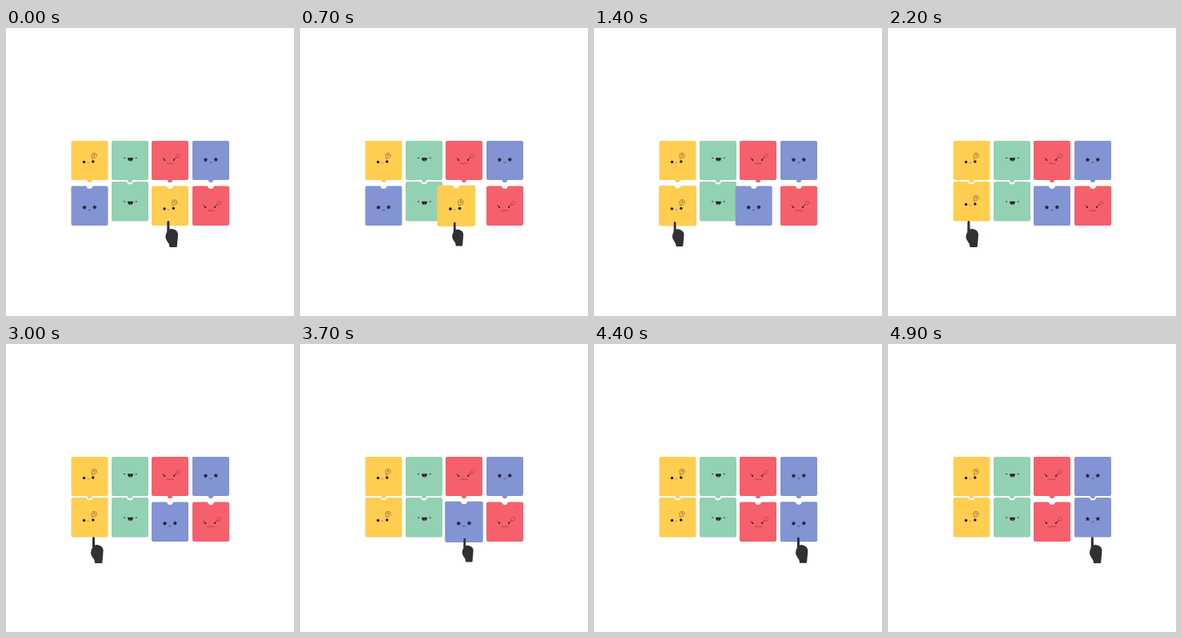
An HTML page with a canvas that plays this animation: 360 by 360 pixels, repeating every 5 s.

```html
<!DOCTYPE html>
<html lang="en">
<head>
<meta charset="utf-8">
<title>Matching cards</title>
<style>
html, body { margin: 0; width: 100%; height: 100%; overflow: hidden; background: #fff; }
canvas { display: block; width: 100vw; height: 100vh; }
</style>
</head>
<body>
<canvas></canvas>
<script>
const SIZE = 360, LOOP = 5000, DPR = window.devicePixelRatio || 1;
const canvas = document.querySelector('canvas');
const ctx = canvas.getContext('2d');
canvas.width = canvas.height = SIZE * DPR;

const COLORS = { yellow: '#ffcd50', green: '#93d1b3', red: '#f6606c', blue: '#8294d3' };
const INK = '#25202a', HAND = '#303133';
const SLOTS = [104.5, 155, 205, 256];
const TOP_Y = 141, LOOSE_Y = 197.5, DOCKED_Y = 192;
const CARD_W = 46, CARD_H = 49;
// Faces sit a little lower on the bottom cards.
const FACE_DROP = { yellow: 2, green: 3.5, red: 2.5, blue: 3 };

const progress = (t, from, to) => Math.min(1, Math.max(0, (t - from) / (to - from)));
const cubic = u => u < .5 ? 4 * u ** 3 : 1 - 4 * (1 - u) ** 3;
const ease = (t, from, to) => cubic(progress(t, from, to));
const mix = (a, b, u) => a + (b - a) * u;

function dot(x, y, r, color = INK) {
  ctx.fillStyle = color;
  ctx.beginPath();
  ctx.arc(x, y, r, 0, 7);
  ctx.fill();
}

function line(path, width = .8, color = INK) {
  ctx.strokeStyle = color;
  ctx.lineWidth = width;
  ctx.stroke(new Path2D(path));
}

function star(x, y, r) {
  ctx.fillStyle = INK;
  ctx.beginPath();
  for (let i = 0; i < 10; i++) {
    const a = i * Math.PI / 5 - Math.PI / 2, d = i % 2 ? r * .5 : r;
    ctx.lineTo(x + d * Math.cos(a), y + d * Math.sin(a));
  }
  ctx.fill();
}

// Face coordinates: x from the card's middle, y from its top edge.
const FACES = {
  yellow() {
    dot(-7, 26.5, 1.75);
    dot(4.3, 26, 1.75);
    line('M-3 27.3q1.3 1.3 2.4 0', .7, '#9a7540');
    line('M3.2 22.3l-.2-2.2a3.1 3.1 0 1 1 2.3 1.4z', .65, '#6b5430');
    line('M4.8 17.6q1-1.2 1.5 0q0 .7-.8 1.1v.5', .6);
  },
  green() {
    line('M-7.7 21.6q.6-1.3 1.6 0M6.9 21.6q1-1.3 1.7 0', 1);
    ctx.fillStyle = INK;
    ctx.fill(new Path2D('M-2.9 21.2h6.8q0 4.2-3.4 4.2t-3.4-4.2z'));
    dot(.6, 24.5, .9, '#a0606c');
  },
  red() {
    line('M-9 21.8l2.8 2.1M7 21.8l-2.7 2.1', .9);
    dot(-6.9, 24, 1);
    dot(5, 24, 1);
    line('M-4.3 28.6q1.2-1.5 2.2-.3t2 0t2 0t2.4-.2', .7, '#873641');
    line('M6 23l2.2-2.3M8.2 20.7c-1.2-2 .3-4.2 2.6-4.1c2.4.2 2.6 3.4.4 4c-1.2.4-2 .1-3 .1', .65, '#914047');
  },
  blue() {
    star(-6.5, 23.7, 3);
    star(6.3, 23.5, 3);
    line('M-1.5 27q1.4 1.7 2.8-.1', .8, '#493d65');
  }
};

const TOP_SHAPE = new Path2D();
TOP_SHAPE.roundRect(-CARD_W / 2, 0, CARD_W, CARD_H, 2);
TOP_SHAPE.arc(0, CARD_H, 3.1, 0, Math.PI);
const BOTTOM_SHAPE = new Path2D(
  'M-21 0H-5Q-4 0-3.7 1Q-2.8 3.5 0 3.5T3.7 1Q4 0 5 0H21Q23 0 23 2' +
  'V47.5Q23 49.5 21 49.5H-21Q-23 49.5-23 47.5V2Q-23 0-21 0Z');
const HAND_SHAPE = new Path2D(
  'M-1.6 1.2Q-.2-1 1.3 1.2L1.5 10.5Q4 9.4 6.2 10.5Q11 11.5 12 16.5' +
  'L11.5 24L10.6 33H1.5L.8 29Q-3.4 23.5-3.6 20Q-3.6 17-1.8 14Z');

function card(kind, x, y, { bottom = false, scale = 1 } = {}) {
  ctx.save();
  ctx.translate(x, y + CARD_H / 2);
  ctx.scale(scale, scale);
  ctx.translate(0, -CARD_H / 2);
  ctx.fillStyle = COLORS[kind];
  ctx.fill(bottom ? BOTTOM_SHAPE : TOP_SHAPE);
  if (bottom) ctx.translate(0, FACE_DROP[kind]);
  FACES[kind]();
  ctx.restore();
}

function hand(x, press) {
  const scale = mix(1, .9, press);
  ctx.save();
  ctx.translate(x + 4, 241 + 17);
  ctx.scale(scale, scale);
  ctx.translate(-4, -17);
  ctx.fillStyle = HAND;
  ctx.fill(HAND_SHAPE);
  ctx.restore();
}

// The held card follows the pointer and snaps once it is near its slot.
function dragX(from, to, u) {
  const x = mix(from, to, u);
  return Math.abs(to - x) < 7 ? to : x;
}

const pressed = (t, down, up) => progress(t, down, down + 80) - progress(t, up, up + 150);

function draw(t) {
  ctx.setTransform(canvas.width / SIZE, 0, 0, canvas.height / SIZE, 0, 0);
  ctx.fillStyle = '#fff';
  ctx.fillRect(0, 0, SIZE, SIZE);
  ctx.lineCap = ctx.lineJoin = 'round';

  const [s1, s2, s3, s4] = SLOTS;
  const drag1 = ease(t, 440, 1340), drag2 = ease(t, 3700, 4280);
  const press1 = pressed(t, 330, 1340), press2 = pressed(t, 3610, 4280);
  const yellowDock = ease(t, 1550, 1800), blueDock = ease(t, 4550, 4800);

  ['yellow', 'green', 'red', 'blue'].forEach((kind, i) => card(kind, SLOTS[i], TOP_Y));

  const bottomCard = (kind, x, dock = 0, press = 0) =>
    card(kind, x, mix(LOOSE_Y, DOCKED_Y, dock), { bottom: true, scale: 1 + .035 * press });

  const yellow = () => bottomCard('yellow', dragX(s3, s1, drag1), yellowDock, press1);
  const blue = () => {
    const x = t < 2500 ? mix(s1, s3, ease(t, 1080, 1500)) : dragX(s3, s4, drag2);
    bottomCard('blue', x, blueDock, press2);
  };
  bottomCard('green', s2, 1);
  bottomCard('red', mix(s4, s3, ease(t, 3950, 4370)));
  blue();
  yellow();

  const handX = 203 - 102 * drag1 + 104.5 * ease(t, 2850, 3400) + 50 * drag2;
  hand(handX, press1 + press2);
}

function frame() {
  draw(performance.now() % LOOP);
  requestAnimationFrame(frame);
}
frame();
</script>
</body>
</html>
```
